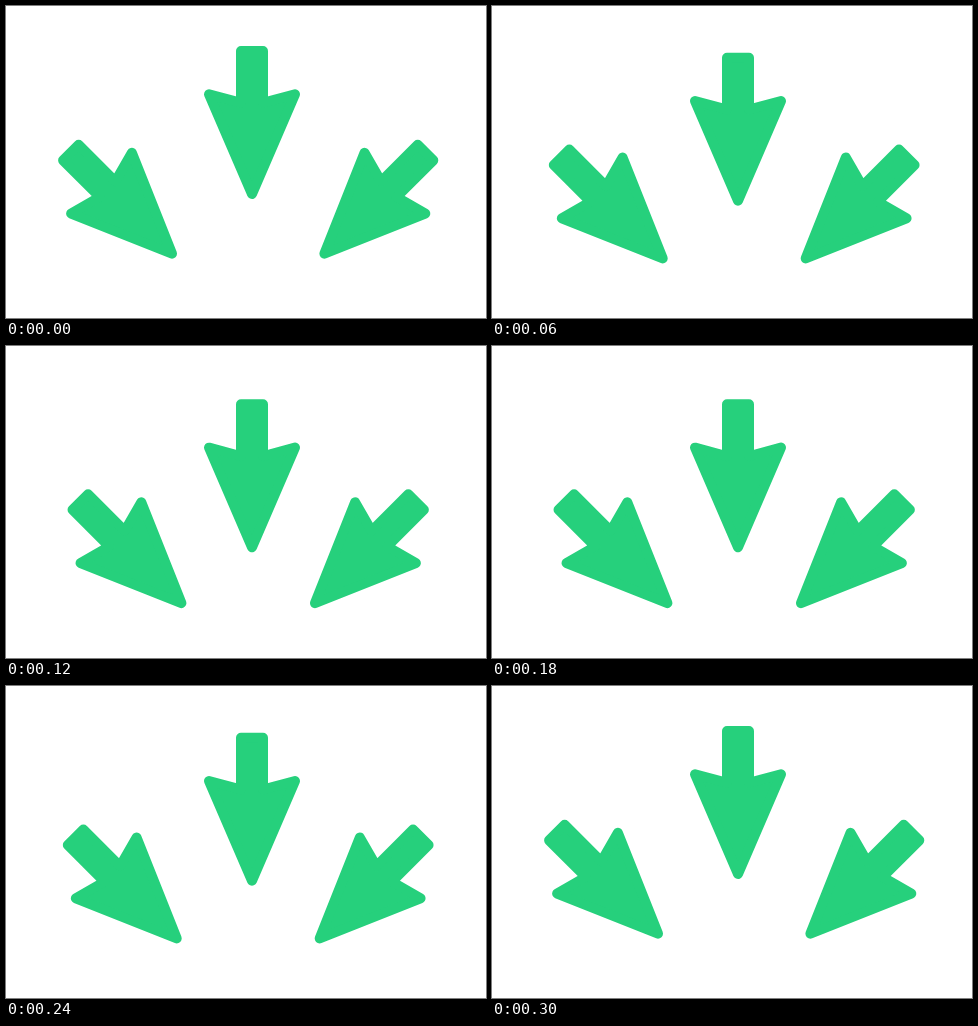
These frames come from a looping animation (480 by 312 pixels, 0.33 s). An HTML page:

```html
<!DOCTYPE html>
<html lang="en">
<head>
<meta charset="utf-8">
<title>Converging arrows</title>
<style>
  html, body { margin: 0; width: 100%; height: 100%; overflow: hidden; background: #fff; }
  svg { display: block; width: 100%; height: 100%; }
</style>
</head>
<body>
<svg viewBox="0 0 480 312">
  <defs>
    <!-- Points down, with the centre of its rounded tip at the origin -->
    <path id="arrow" d="M0 0L-43-99.7L-11-91.1V-143H11V-91.1L43-99.7Z"/>
  </defs>
  <g fill="#26d07c" stroke="#26d07c" stroke-width="10" stroke-linejoin="round">
    <g transform="translate(246 188)"><use href="#arrow"/></g>
    <g transform="translate(166 247.7) rotate(-45)"><use href="#arrow"/></g>
    <g transform="translate(318.4 247.7) rotate(45)"><use href="#arrow"/></g>
  </g>
</svg>
<script>
  const STEP_MS = 30, STEPS = 11, STEP_PX = 10 / 3;
  const arrows = document.querySelectorAll('use');

  function draw() {
    const step = Math.floor(performance.now() / STEP_MS) % STEPS;
    const shift = (5 - Math.abs(5 - step)) * STEP_PX;
    for (const arrow of arrows) arrow.setAttribute('y', shift);
    requestAnimationFrame(draw);
  }
  draw();
</script>
</body>
</html>
```
